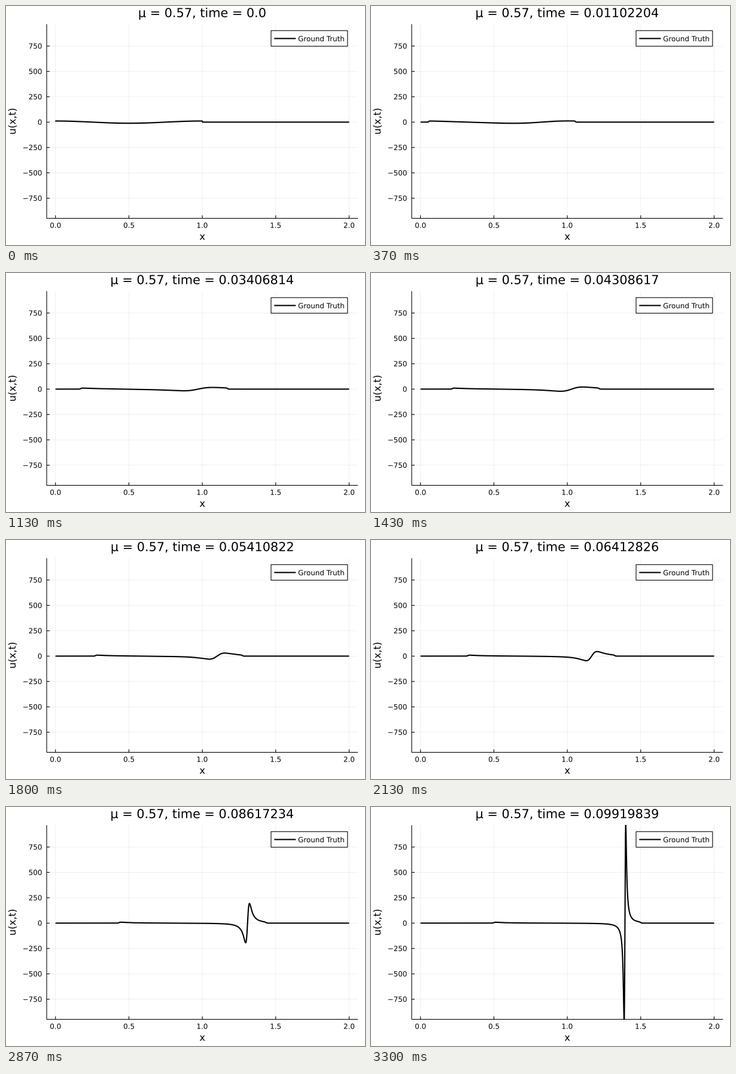
These frames come from a looping animation (600 px wide and 400 px high, 3330 ms). A matplotlib script:

```python
import numpy as np
import matplotlib.pyplot as plt
from matplotlib.animation import FuncAnimation
from matplotlib.patches import PathPatch, Rectangle
from matplotlib.path import Path
from matplotlib.textpath import TextPath

W, H, DPI = 600, 400, 100
STEPS, FPS = 100, 30
TICK_MS, LOOP_MS = 10, 3330
MU, T_END = 0.57, 0.5
PT = 72 / DPI  # points per pixel

# Plot box and data scales in pixels
L, R, T, B = 68.0, 588.2, 30.4, 355.4
X_UNIT, Y_UNIT, Y_ZERO = (R - L) / 2.12, 0.1698, 194.35

x = np.linspace(0, 2, 1001)
xi = np.linspace(-1, 3, 40001)
w0 = 1 + MU / 2 * (1 - np.cos(2 * np.pi * xi))


def to_x(v):
    return L + (v + 0.06) * X_UNIT


def to_y(u):
    return Y_ZERO - u * Y_UNIT


def curvature(k):
    """Second difference of the Burgers wave, traced along characteristics."""
    s = T_END * k / (STEPS - 1)
    h = 0.004 + 0.0021 * (s / T_END) ** 5
    foot = xi + s * w0

    def wave(at):
        return np.interp(at, foot, w0)

    u = (wave(x + h) - 2 * wave(x) + wave(x - h)) / h ** 2
    blur = max(0.01 * np.cbrt(s), 0.0008)
    left = 0.5 * (1 + np.tanh((x - s) / blur))
    right = 0.5 * (1 - np.tanh((x - 1 - s) / blur))
    return u * left * right


def title_text(k):
    t = round(float(np.float32(T_END * k / 499)), 8)
    return f"μ = {MU}, time = {t}"


def text_path(text, size, px, py, align=0.5, upright=False):
    """Glyph outlines on baseline py; align 0, 0.5, 1 is left, centre, right."""
    path = TextPath((0, 0), text, size=size, prop={"family": "DejaVu Sans"})
    box = path.get_extents()
    along = path.vertices[:, 0] - box.x0 - align * box.width
    up = path.vertices[:, 1]
    dx, dy = (-up, -along) if upright else (along, -up)
    return Path(np.column_stack([px + dx, py + dy]), path.codes)


fig = plt.figure(figsize=(W / DPI, H / DPI), dpi=DPI, facecolor="white")
ax = fig.add_axes([0, 0, 1, 1])
ax.set_xlim(0, W)
ax.set_ylim(H, 0)
ax.axis("off")


def label(*args, **kw):
    patch = PathPatch(text_path(*args, **kw), fc="black", lw=0, zorder=6)
    return ax.add_patch(patch)


def line(xs, ys, width=1.1, **kw):
    style = dict(color="black", lw=width * PT, solid_capstyle="butt",
                 snap=False)
    return ax.plot(xs, ys, **{**style, **kw})[0]


# Grid, ticks and axis lines
for v in (0, 0.5, 1, 1.5, 2):
    px = to_x(v)
    line([px, px], [T, B], 0.6, alpha=0.1, zorder=1)
    line([px, px], [B, B - 5])
    label(f"{v:.1f}", 11.9, px, 371.3)
for u in range(-750, 751, 250):
    py = to_y(u)
    line([L, R], [py, py], 0.6, alpha=0.1, zorder=1)
    line([L, L + 5], [py, py])
    label(str(u).replace("-", "−"), 11.9, 59.6, py + 4.3, align=1)
line([L, L], [T, B])
line([L, R], [B, B])

# Labels
mid_x, mid_y = (L + R) / 2, (T + B) / 2
label("x", 16.4, mid_x, 391.3)
label("u(x,t)", 16.5, 16, mid_y, upright=True)
title = label(title_text(0), 20.8, mid_x, 18.6)

# Legend
ax.add_patch(Rectangle((443, 41.2), 127.8, 26.1, fc="white", ec="black",
                       lw=1.1 * PT, snap=False, zorder=5))
line([448.3, 484.3], [54.4, 54.4], 2.1, zorder=6)
label("Ground Truth", 11.9, 488.8, 59, align=0)

curve = line([], [], 2.1, zorder=3)
curve.set_clip_path(Rectangle((L, T), R - L, B - T, transform=ax.transData))


def draw(tick):
    k = int((tick + 0.5) * TICK_MS * FPS / 1000)
    curve.set_data(to_x(x), to_y(curvature(k)))
    title.set_path(text_path(title_text(k), 20.8, mid_x, 18.6))
    return curve, title


anim = FuncAnimation(fig, draw, frames=LOOP_MS // TICK_MS, interval=TICK_MS,
                     repeat=True, repeat_delay=0, blit=False)
plt.show()
```
